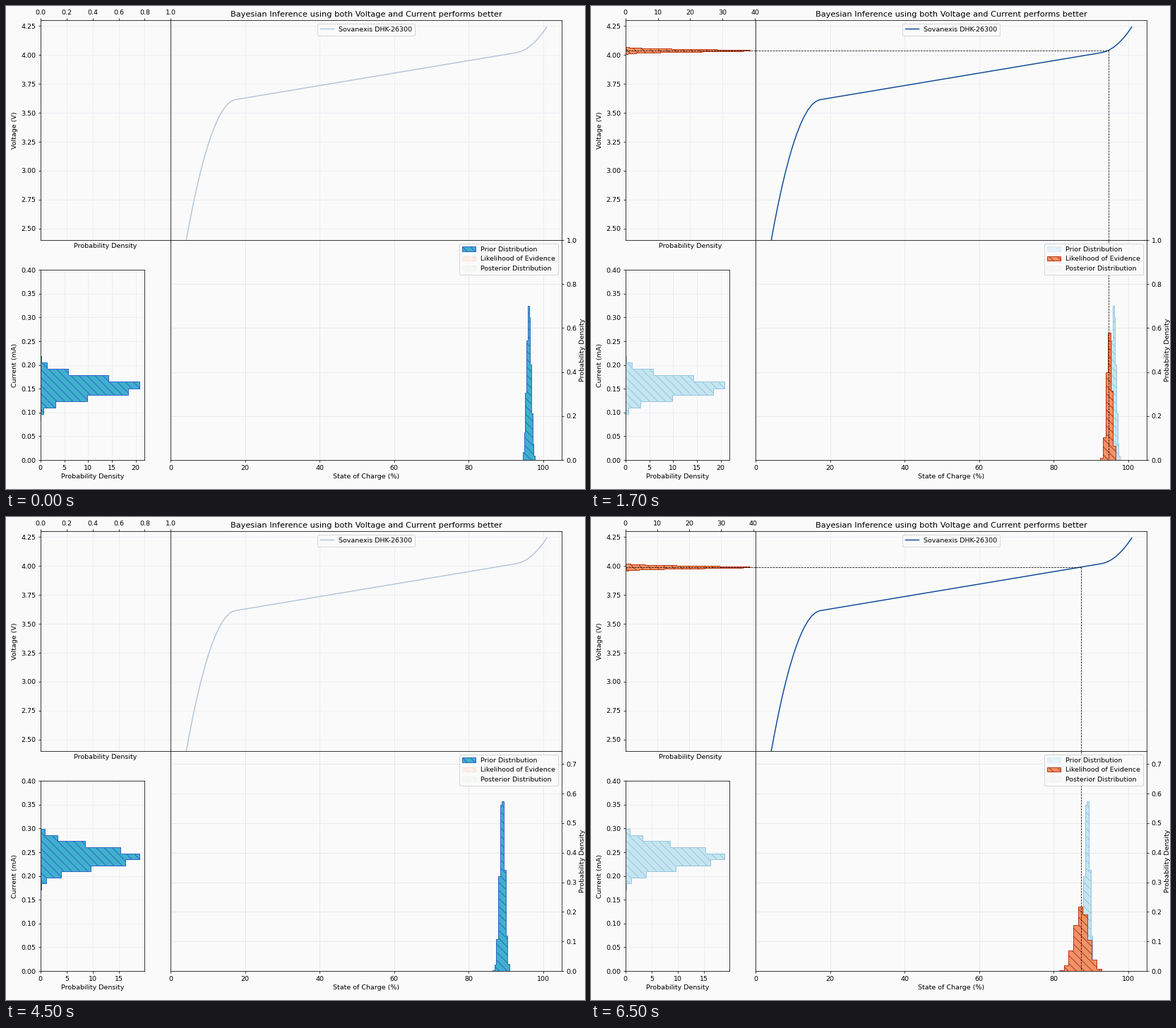
Recreate the animation shown at these times as a matplotlib script. Size 820 by 683 pixels, loop 8 s.

```python
import numpy as np
import matplotlib.pyplot as plt
from matplotlib.animation import FuncAnimation
from matplotlib.patches import Patch

W, H = 820, 683
DPI = W / 12
BACKGROUND = "#fafafa"
HATCH = "\\" * 2
plt.rcParams.update({
    "font.family": "DejaVu Sans", "font.size": 10,
    "figure.facecolor": BACKGROUND, "axes.facecolor": BACKGROUND,
    "axes.axisbelow": True, "hatch.linewidth": 1.0,
})

# (face, edge) of each distribution at each emphasis
STYLES = {
    "prior": {"strong": ("#3fb0ce", "#3163c5"),
              "mid": ("#c4e5ef", "#97c3e3"),
              "faint": ("#e6f3f8", "#dbebf5")},
    "likelihood": {"strong": ("#f09268", "#b5330f"),
                   "mid": ("#fae0d6", "#e8a98c"),
                   "faint": ("#fdf1ea", "#fae3d6")},
    "posterior": {"strong": ("#cceacf", "#5cb85f"),
                  "faint": ("#f5f8f5", "#eef4ee")},
}
LEGEND = {"prior": "Prior Distribution",
          "likelihood": "Likelihood of Evidence",
          "posterior": "Posterior Distribution"}

# Each distribution is (lowest edge, highest edge, mean, peak density)
FIRST = {
    "current": (0.0826, 0.2193, 0.1543, 20.83),
    "voltage": (4.0075, 4.0705, 4.04, 38.36),
    "prior": (94.6, 97.85, 96.15, 0.70),
    "likelihood": (89.83, 96.66, 94.87, 0.579),
    "posterior": (94.55, 96.7, 95.58, 1.2),
    "top": 1.0, "step": 0.2,
}
SECOND = {
    "current": (0.171, 0.2988, 0.2403, 18.97),
    "voltage": (3.9603, 4.0197, 3.991, 38.9),
    "prior": (85.9, 91.0, 88.98, 0.575),
    "likelihood": (80.3, 92.8, 87.46, 0.217),
    "top": 0.7437, "step": 0.1,
}

# (measurement, active distribution, number of half-second frames)
SCHEDULE = [(FIRST, "prior", 1), (FIRST, "likelihood", 4), (FIRST, "posterior", 4),
            (SECOND, "prior", 4), (SECOND, "likelihood", 3)]
TIMELINE = [(data, active) for data, active, count in SCHEDULE for _ in range(count)]

fig = plt.figure(figsize=((W + .001) / DPI, (H + .001) / DPI), dpi=DPI)

LEFT, RIGHT, TOP, BOTTOM = 48.8, 786.9, 20.2, 642.0
SPLIT = LEFT + (RIGHT - LEFT) / 4
MIDDLE = (TOP + BOTTOM) / 2


def panel(left, top, right, bottom):
    return fig.add_axes([left / W, 1 - bottom / H, (right - left) / W, (bottom - top) / H])


volt_ax = panel(LEFT, TOP, SPLIT, MIDDLE)
curve_ax = panel(SPLIT, TOP, RIGHT, MIDDLE)
current_ax = panel(LEFT, 373.2, LEFT + (RIGHT - LEFT) / 5, BOTTOM)
soc_ax = panel(SPLIT, MIDDLE, RIGHT, BOTTOM)


def ticks(stop, step, start=0):
    return np.arange(start, stop + step / 1000, step)


def cell_voltage(soc):
    """Linear plateau with a quadratic knee at each end."""
    line = 3.736 + 0.005376 * (soc - 40)
    low = np.maximum(17.3 - soc, 0)
    high = np.maximum(soc - 92.8, 0)
    return line - 0.00663 * low ** 2 + 0.00265 * high ** 2


def histogram(ax, spec, kind, emphasis, **kwargs):
    """Ten bins of a normal distribution whose peak density sets its width."""
    low, high, mean, peak = spec
    edges = np.linspace(low, high, 11)
    centers = (edges[1:] + edges[:-1]) / 2
    bell = np.exp(-np.pi * (peak * (centers - mean)) ** 2)
    face, edge = STYLES[kind][emphasis]
    ax.stairs(peak * bell / bell.max(), edges, fill=True, facecolor=face,
              edgecolor=edge, hatch=HATCH, linewidth=1, **kwargs)


def evidence(data):
    return data["likelihood"][2], data["voltage"][2]


def dashes(ax, xs, ys):
    ax.plot(xs, ys, "--", color="black", lw=0.8, scalex=False, scaley=False)


def draw_voltage(data, active):
    ax = volt_ax
    top = 1.0
    if active != "prior":
        top = 1.05 * data["voltage"][3]
        emphasis = "strong" if active == "likelihood" else "mid"
        histogram(ax, data["voltage"], "likelihood", emphasis, orientation="horizontal")
    ax.set(xlim=(0, top), ylim=(2.4, 4.3), xlabel="Probability Density", ylabel="Voltage (V)")
    ax.set_xticks(ticks(top, 0.2 if top == 1 else 10))
    ax.set_yticks(ticks(4.25, 0.25, 2.5))
    ax.xaxis.tick_top()
    if active == "likelihood":
        volt = evidence(data)[1]
        dashes(ax, (0, top), (volt, volt))


def draw_curve(data, active):
    ax = curve_ax
    soc = np.arange(0, 102)
    color = "#084594" if active == "likelihood" else "#b1c4db"
    ax.plot(soc, cell_voltage(soc), color=color, lw=1.5, label="Sovanexis DHK-26300")
    ax.set(xlim=(0, 105), ylim=(2.4, 4.3))
    ax.set_xticks(ticks(100, 20))
    ax.set_yticks(ticks(4.25, 0.25, 2.5))
    ax.tick_params(length=0, labelbottom=False, labelleft=False)
    ax.set_title("Bayesian Inference using both Voltage and Current performs better")
    if active == "likelihood":
        charge, volt = evidence(data)
        dashes(ax, (0, charge), (volt, volt))
        dashes(ax, (charge, charge), (volt, 2.4))
    ax.legend(loc="upper center")


def draw_current(data, active):
    ax = current_ax
    emphasis = "strong" if active == "prior" else "mid"
    histogram(ax, data["current"], "prior", emphasis, orientation="horizontal")
    top = 1.05 * data["current"][3]
    ax.set(xlim=(0, top), ylim=(0, 0.4), xlabel="Probability Density", ylabel="Current (mA)")
    ax.set_xticks(ticks(top, 5))
    ax.set_yticks(ticks(0.4, 0.05))


def draw_soc(data, active):
    ax = soc_ax
    kinds = list(LEGEND)
    background = "mid" if active == "likelihood" else "faint"
    for kind in kinds[:kinds.index(active) + 1]:
        histogram(ax, data[kind], kind, "strong" if kind == active else background)
    ax.set(xlim=(0, 105), ylim=(0, data["top"]),
           xlabel="State of Charge (%)", ylabel="Probability Density")
    ax.set_xticks(ticks(100, 20))
    ax.set_yticks(ticks(data["top"], data["step"]))
    ax.yaxis.tick_right()
    ax.yaxis.set_label_position("right")
    if active == "likelihood":
        charge = evidence(data)[0]
        dashes(ax, (charge, charge), (data["top"], 0))
    handles = []
    for kind, text in LEGEND.items():
        face, edge = STYLES[kind]["strong" if kind == active else "faint"]
        handles.append(Patch(facecolor=face, edgecolor=edge, hatch=HATCH, label=text))
    ax.legend(handles=handles, loc="upper right")


def draw(frame):
    data, active = TIMELINE[frame]
    for ax in fig.axes:
        ax.clear()
        ax.grid(color="#e1e4ea" if ax is soc_ax else "#e8ebf3", lw=0.8)
    draw_voltage(data, active)
    draw_curve(data, active)
    draw_current(data, active)
    draw_soc(data, active)
    return []


anim = FuncAnimation(fig, draw, frames=len(TIMELINE), init_func=lambda: draw(0),
                     interval=500, repeat=True, repeat_delay=0)
plt.show()
```
